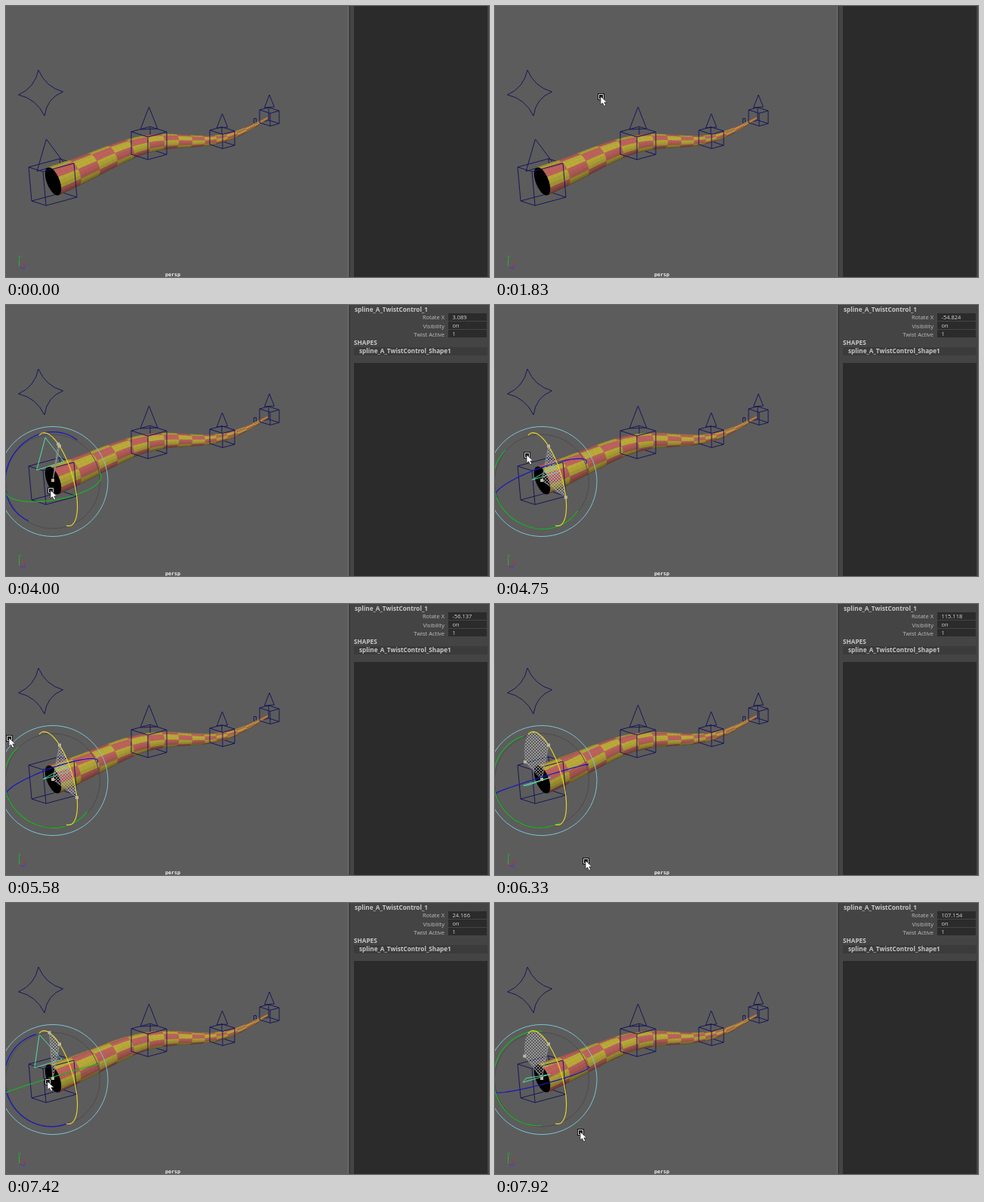
Write an HTML page with a canvas that moves like this. It is 640 px wide and 360 px high and loops after 8 s.

```html
<!DOCTYPE html>
<html lang="en">
<head>
<meta charset="utf-8">
<title>Twist control</title>
<style>
html, body { margin: 0; width: 100%; height: 100%; overflow: hidden; background: #5c5c5c; }
canvas { display: block; }
</style>
</head>
<body>
<canvas id="stage" width="640" height="360"></canvas>
<script>
const g = document.getElementById('stage').getContext('2d');
const { PI, sin, cos } = Math;
const LOOP = 8000, STEP = 1000 / 12, RAD = PI / 180;
const NAVY = '#17175a', SELECT = '#55dca4';
const C = [62, 233], R = 62.6;

// Steps at which things begin
const ENTER = 13, PICK = 31, ROTATE = 38, DRAG = 41;

// Turning points of the pointer: step, x, y, angle
const LOW = [125, 348, 122];
const TURNS = [[ENTER, 346, 346, 0], [20, 146, 101, 0], [22, 140, 120, 0], [29, 38, 182, 0],
  [36, 61, 170, 0], [DRAG, 70, 189, 0], [45, 30, 200, -50], [53, ...LOW],
  [57, 42, 199, -54.824], [62, ...LOW], [67, 4, 178, -56.137], [75, ...LOW],
  [83, -2, 171, -58.822], [95, 113, 304, 107.154]];

// Control boxes: left corner, the two visible widths, height
const BOXES = [[30, 214, 19, 41, 45], [166, 167, 22, 25, 30], [270, 165, 17, 16, 19], [336, 138, 14, 12, 17]];

// Twist axis with two directions square to it: x right, y down, z to the viewer
const X = [.904, -.271, -.33], UP = [-.287, -.958, 0], FRONT = [.316, -.095, .944];
const REST = 23, GRAB = 58;

const blend = (a, b, p, q) => a.map((v, i) => v * p + b[i] * q);
const around = deg => blend(UP, FRONT, cos(deg * RAD), sin(deg * RAD));
const place = (v, size) => [C[0] + v[0] * size, C[1] + v[1] * size];
const onSphere = v => place(v, R / (1 - .24 * v[2]));
const shift = (p, x, y) => [p[0] + x, p[1] + y];
const range = (n, f) => Array.from({ length: n }, (_, i) => f(i));

function trace(points, close) {
  g.beginPath();
  points.forEach(p => g.lineTo(p[0], p[1]));
  if (close) g.closePath();
}
function line(points, color, close, width = 1) {
  trace(points, close);
  g.strokeStyle = color;
  g.lineWidth = width;
  g.stroke();
}
function fill(points, color) {
  trace(points, true);
  g.fillStyle = color;
  g.fill();
}
function rect(x, y, w, h, color) {
  g.fillStyle = color;
  g.fillRect(x, y, w, h);
}
function circle(r, color) {
  g.beginPath();
  g.arc(C[0], C[1] + 1.5, r, 0, PI * 2);
  g.strokeStyle = color;
  g.lineWidth = 1;
  g.stroke();
}
function text(s, x, y, font, color, align = 'left') {
  g.font = font;
  g.fillStyle = color;
  g.textAlign = align;
  g.fillText(s, x, y);
}

function pose(n) {
  const i = Math.max(1, TURNS.findIndex(k => n <= k[0]));
  const a = TURNS[i - 1], b = TURNS[i];
  const p = Math.max(0, (n - a[0]) / (b[0] - a[0])), e = (1 - cos(p * PI)) / 2;
  return blend(a, b, 1 - e, e).slice(1);
}

// Cross-section of the tube at cell position u, as a function of the angle round it
const CELLS = 16, ROWS = 8, SUB = 4;
function section(u) {
  const along = u => 27.5 * u - .61 * u * u, length = along(CELLS);
  const at = u => {
    const p = along(u) / length, w = PI * p;
    return [62.5 + length * p, 233 - 84 * p - 5.6 * sin(w) - 8.65 * sin(2 * w) + 4.7 * sin(3 * w)];
  };
  const [x, y] = at(u), [nx, ny] = at(u + .01);
  const len = Math.hypot(nx - x, ny - y), tx = (nx - x) / len, ty = (ny - y) / len;
  const r = 19.7 - 18.7 * along(u) / length;
  return f => {
    const up = r * sin(f), out = .43 * r * cos(f);
    return [x + up * ty + out * tx, y - up * tx + out * ty];
  };
}
const SECTIONS = range(CELLS * SUB + 1, i => section(i / SUB));

function drawTube(angle) {
  const side = PI / 2, part = 2 * PI / ROWS / 3;
  for (let i = CELLS * SUB - 1; i >= 0; i--) {
    const twist = (10 - angle * (1 - (i + .5) / (CELLS * SUB))) * RAD;
    const p = SECTIONS[i], q = SECTIONS[i + 1];
    for (let j = Math.floor((-side - twist) / part); j * part + twist < side; j++) {
      const a = Math.max(-side, j * part + twist), b = Math.min(side, (j + 1) * part + twist);
      const odd = (Math.floor(j / 3) + Math.floor(i / SUB)) & 1;
      const light = .62 + .36 * cos((a + b) / 2 - .5);
      const color = `rgb(${(odd ? [192, 176, 58] : [195, 100, 94]).map(v => Math.round(v * light))})`;
      const quad = [p(a), q(a), q(b), p(b)];
      fill(quad, color);
      line(quad, color, true, .4);
    }
  }
  fill(range(40, i => SECTIONS[0](i * PI / 20)), '#000');
}

function drawBoxes(back) {
  BOXES.forEach(([x, y, a, b, h], i) => {
    const left = [x, y], front = shift(left, a, a * .32), right = shift(front, b, -b * .27);
    const rear = shift(left, b, -b * .27);
    const down = p => shift(p, i ? 0 : 4, h);
    const [near, far] = [front, rear];
    if (back) {
      line([left, far, right], NAVY);
      line([down(left), down(far), down(right)], NAVY);
      line([far, down(far)], NAVY);
      if (i) {
        const mid = shift(left, (a + b) / 2, -3);
        line([shift(mid, 0, -h), shift(mid, -h * .38, 0), shift(mid, h * .38, -1)], NAVY, true);
      }
    } else {
      line([left, near, right, down(right), down(near), down(left)], NAVY, true);
      line([near, down(near)], NAVY);
    }
  });
}

function drawStar() {
  const tips = [[43, 85], [75.5, 114], [51, 146], [16.5, 118]], mid = [46, 115];
  g.beginPath();
  g.moveTo(...tips[0]);
  tips.forEach((p, i) => {
    const q = tips[(i + 1) % 4], bend = blend(blend(p, q, .5, .5), mid, .48, .52);
    g.quadraticCurveTo(...bend, ...q);
  });
  g.strokeStyle = NAVY;
  g.lineWidth = 1;
  g.stroke();
}

function drawTwistCone(angle, color) {
  const y = around(REST - angle);
  const foot = w => place(blend(y, X, 20.5, w), 1);
  line([place(y, 61), foot(20), foot(-20)], color, true);
}

function drawMover() {
  const arrow = (x, y, size, color) => {
    const len = Math.hypot(x, y), ux = x / len * size, uy = y / len * size;
    const tip = shift(C, x, y), base = shift(tip, -ux, -uy);
    line([C, base], '#8c8c8c');
    fill([tip, shift(base, -uy * .25, ux * .25), shift(base, uy * .25, -ux * .25)], color);
  };
  const plate = (x, y, w, h, slant, color) =>
    fill([[x, y], [x + w, y - slant], [x + w, y + h - slant], [x, y + h]], color);
  arrow(-9, -74, 15, '#a4a4a4');
  arrow(64, -18, 10, '#8e8e8e');
  arrow(40, 27, 13, '#a4a4a4');
  plate(94, 175, 12, 11, 2, '#4747b4');
  plate(76, 194, 8, 10, -4, '#b8493f');
  fill([[120, 233], [130, 230], [136, 234], [126, 238]], '#43a83c');
  g.strokeStyle = '#bbb';
  g.strokeRect(55.5, 226.5, 13, 13);
}

// The half of the ring through u and v that faces the viewer
function halfRing(u, v, color) {
  const nearest = Math.atan2(v[2], u[2]);
  line(range(49, i => {
    const a = nearest + (i / 48 - .5) * PI;
    return onSphere(blend(u, v, cos(a), sin(a)));
  }), color, false, 1.2);
}

const tile = document.createElement('canvas');
tile.width = tile.height = 4;
const dots = tile.getContext('2d');
dots.fillStyle = 'rgba(185,185,185,.65)';
dots.fillRect(0, 0, 2, 2);
dots.fillRect(2, 2, 2, 2);
const stipple = g.createPattern(tile, 'repeat');

function drawRotator(angle, dragging) {
  const turn = REST - angle;
  circle(R, '#4b4b4b');
  circle(73, '#7cc3d2');
  const arc = range(41, i => onSphere(around(GRAB - angle * i / 40)));
  if (dragging) {
    fill([C, ...arc], stipple);
    line([arc[0], C, arc[40]], '#8a8a8a');
  }
  halfRing(X, around(turn), '#1616c4');
  halfRing(X, around(turn + 90), '#18b422');
  halfRing(UP, FRONT, dragging ? '#e6cf2c' : '#d02020');
  if (dragging) [arc[0], arc[40], C].forEach(p => rect(p[0] - 2, p[1] - 2, 4, 4, '#bcb89c'));
}

function drawAxes() {
  const axis = (name, x, y, color) => {
    line([[17.5, 346.5], [17.5 + x, 346.5 + y]], color);
    text(name, 16 + x, 345 + y, '6.5px "DejaVu Sans", sans-serif', color);
  };
  axis('y', 0, -10, '#25b52c');
  axis('z', 7, 3, '#3c3cdc');
  axis('x', 7, -2, '#c03030');
}

function drawPanel(picked, angle) {
  rect(453, 0, 187, 360, '#444');
  rect(453, 0, 1, 360, '#707070');
  rect(455, 0, 1, 360, '#383838');
  rect(461, picked ? 77 : 0, 177, 360, '#2b2b2b');
  if (!picked) return;
  const bold = 'bold 8.2px "Open Sans", sans-serif', plain = '7.5px "Open Sans", sans-serif';
  const rows = [['Rotate X', angle ? angle.toFixed(3) : '0'], ['Visibility', 'on'], ['Twist Active', '1']];
  text('spline_A_TwistControl_1', 462, 8.5, bold, '#c8c8c8');
  rows.forEach(([name, value], i) => {
    const y = 11 + 11.2 * i;
    rect(586, Math.round(y), 51, 10, '#2b2b2b');
    text(name, 581, y + 8.4, plain, '#bdbdbd', 'right');
    text(value, 591.5, y + 8, plain, '#d4d4d4');
  });
  rect(461, 56, 177, 11, '#3b3b3b');
  text('SHAPES', 461, 52.5, bold, '#c8c8c8');
  text('spline_A_TwistControl_Shape1', 468, 64, bold, '#c8c8c8');
}

function drawPointer(px, py) {
  const x = Math.round(px), y = Math.round(py);
  rect(x - 4, y - 4, 9, 9, '#181818');
  g.strokeStyle = '#d0d0d0';
  g.lineWidth = 1;
  g.strokeRect(x - 2.5, y - 2.5, 6, 6);
  const arrow = [[0, 0], [0, 11], [2.6, 8.8], [4.6, 13], [6.8, 12], [4.8, 8], [8.5, 8]]
    .map(p => shift(p, x, y));
  fill(arrow, '#fff');
  line(arrow, '#222', true, .7);
}

function draw(n) {
  const [x, y, angle] = pose(n), picked = n >= PICK;
  g.lineJoin = 'round';
  rect(0, 0, 640, 360, '#5c5c5c');
  drawStar();
  drawBoxes(true);
  if (!picked) drawTwistCone(0, NAVY);
  g.strokeRect(328.5, 149.5, 3, 6);
  drawTube(angle);
  drawBoxes(false);
  if (picked) drawTwistCone(angle, SELECT);
  if (n >= ROTATE) drawRotator(angle, n >= DRAG);
  else if (picked) drawMover();
  drawAxes();
  text('persp', 211, 358.5, 'bold 6.7px "DejaVu Sans Mono", monospace', '#f0f0f0');
  drawPanel(picked, angle);
  if (n >= ENTER) drawPointer(x, y);
}

let shown = -1;
function tick(now) {
  const n = Math.floor((now % LOOP + 4) / STEP) % 96;
  if (n !== shown) draw(shown = n);
  requestAnimationFrame(tick);
}
requestAnimationFrame(tick);
</script>
</body>
</html>
```
